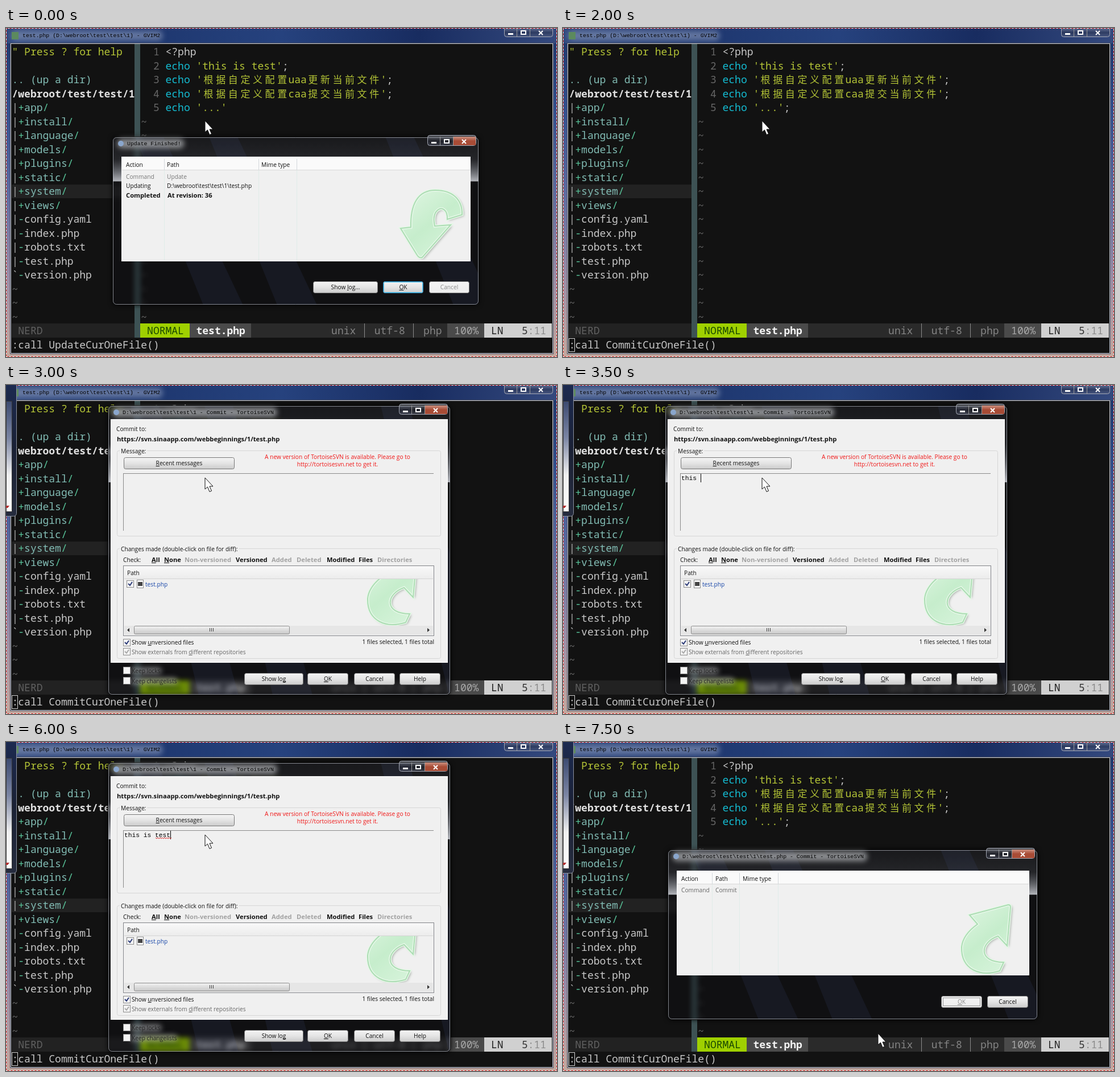
An HTML page with a canvas for the animation above (8000 ms loop, 969x578 px).

```html
<!DOCTYPE html>
<html lang="en">
<head>
<meta charset="utf-8">
<title>Committing a file from the editor</title>
<style>
html, body { margin: 0; width: 100%; height: 100%; overflow: hidden; background: #000; }
canvas { display: block; }
</style>
</head>
<body>
<canvas id="stage" width="969" height="578"></canvas>
<script>
const W = 969, H = 578, LOOP = 8000, STEP = 500;
const base = document.getElementById('stage').getContext('2d');
const layer = new OffscreenCanvas(W, H).getContext('2d');
let g = base;

const MONO = '"Noto Sans Mono", monospace';
const CJK = '"Noto Sans CJK SC", "Noto Sans CJK", sans-serif';
const UI = '"Open Sans", "Noto Sans", sans-serif';
const FIXED = '"Liberation Mono", monospace';
const CELL = 10.8, ROW = 24.52;
const colX = col => 10.5 + col * CELL;
const YELLOW = '#b4c436', CYAN = '#14bcd2', PALE = '#c8c8c8', DIM = '#666', TEAL = '#82bcb4', MINT = '#58c49a';

function box(x0, y0, x1, y1, fill, stroke) {
  if (fill) { g.fillStyle = fill; g.fillRect(x0, y0, x1 - x0, y1 - y0); }
  if (stroke) { g.strokeStyle = stroke; g.lineWidth = 1; g.strokeRect(x0 + .5, y0 + .5, x1 - x0 - 1, y1 - y0 - 1); }
}

function gradient(x0, y0, x1, y1, ...colors) {
  const grad = g.createLinearGradient(x0, y0, x1, y1);
  colors.forEach((c, i) => grad.addColorStop(i / (colors.length - 1), c));
  return grad;
}

function shape(path, fill, stroke, width = 1) {
  const p = new Path2D(path);
  if (fill) { g.fillStyle = fill; g.fill(p); }
  if (stroke) { g.strokeStyle = stroke; g.lineWidth = width; g.stroke(p); }
}

function rounded(x0, y0, x1, y1, r, fill, stroke) {
  g.beginPath();
  g.roundRect(x0 + .5, y0 + .5, x1 - x0 - 1, y1 - y0 - 1, r);
  if (fill) { g.fillStyle = fill; g.fill(); }
  if (stroke) { g.strokeStyle = stroke; g.lineWidth = 1; g.stroke(); }
}

// Editor text on the character grid; wide characters take two cells.
function put(row, col, ...spans) {
  g.textAlign = 'left';
  for (const [text, color, weight = 300] of spans) {
    g.fillStyle = color;
    for (const ch of text) {
      const wide = ch > '\u2fff';
      g.font = wide ? `300 17px ${CJK}` : `${weight} 18px ${MONO}`;
      g.fillText(ch, colX(col) + (wide ? 2.3 : 0), 48 + row * ROW);
      col += wide ? 2 : 1;
    }
  }
}

// Dialog text centred on y; "&" underlines the next letter.
function label(text, x, y, { color = '#111', bold = false, align = 'left' } = {}) {
  g.font = bold ? `bold 11.2px ${UI}` : `10.2px ${UI}`;
  g.textAlign = 'left';
  g.fillStyle = color;
  const mark = text.indexOf('&'), plain = text.replace('&', '');
  const width = s => g.measureText(s).width;
  x -= { left: 0, center: .5, right: 1 }[align] * width(plain);
  g.fillText(plain, x, y + 4);
  if (mark >= 0) g.fillRect(x + width(plain.slice(0, mark)), y + 5, width(plain[mark]), 1);
}

function glow(x0, y0, x1, y1, color) {
  g.save();
  g.filter = 'blur(5px)';
  rounded(x0, y0, x1, y1, 8, color);
  g.restore();
}

function titleText(text, x, y, size = 9.85) {
  g.font = `${size}px ${FIXED}`;
  g.textAlign = 'left';
  g.fillStyle = '#000';
  g.fillText(text, x, y + 3);
}

function captionButtons(right, top, closeColor) {
  const x = right - 91, cy = top + 8;
  rounded(x, top - 3, right - 5, top + 16, 4, gradient(0, top, 0, top + 16, 'rgba(170,176,190,.4)', 'rgba(40,44,60,.4)', 'rgba(110,116,140,.4)'), '#a4a8b4');
  if (closeColor) box(x + 46, top, right - 6, top + 15, gradient(0, top, 0, top + 15, '#cc9080', closeColor, closeColor));
  box(x + 22, top, x + 23, top + 15, '#999');
  box(x + 45, top, x + 46, top + 15, '#999');
  box(x + 7, cy + 1, x + 16, cy + 4, '#fff');
  g.strokeStyle = '#fff'; g.lineWidth = 2;
  g.strokeRect(x + 30, cy - 3, 8, 6);
  shape(`M${x + 61} ${cy - 3}l7 7m0-7l-7 7`, null, '#fff', 2);
}

function button(text, x0, x1, y, kind) {
  const fills = { hot: ['#e4f3fb', '#a9d6ef', '#7db9dc'], off: ['#f4f4f4', '#ececec'] }[kind] || ['#f5f5f5', '#e4e4e4', '#cacaca'];
  rounded(x0, y, x1, y + 21, 3, gradient(0, y, 0, y + 21, ...fills), kind === 'hot' || kind === 'focus' ? '#2f88b8' : '#777');
  if (kind === 'focus') rounded(x0 + 1, y + 1, x1 - 1, y + 20, 2, null, '#55c4ec');
  label(text, (x0 + x1) / 2, y + 10, { align: 'center', color: kind === 'off' ? '#8c8c8c' : '#111' });
}

function checkbox(x, y, checked, color = '#2b3a78') {
  box(x, y, x + 13, y + 13, '#f4f4f4', '#8c8c8c');
  if (checked) shape(`M${x + 3} ${y + 6}l3 3l4-6`, null, color, 2);
}

// Translucent dialog frame over the editor.
function glass(x0, y0, x1, y1, title, blur = 4) {
  const edge = y0 + (y1 - y0) * .265;
  g.save();
  g.shadowColor = '#000'; g.shadowBlur = 8;
  rounded(x0, y0, x1, y1, 7, '#111');
  g.restore();
  g.save();
  g.beginPath();
  g.roundRect(x0, y0, x1 - x0, y1 - y0, 7);
  g.clip();
  g.filter = `blur(${blur}px)`;
  g.drawImage(base.canvas, 0, 0);
  g.filter = 'none';
  box(x0, y0, x1, y1, 'rgba(14,14,18,.35)');
  box(x0, y0, x1, edge, gradient(0, y0, 0, edge, 'rgba(120,125,135,.08)', 'rgba(130,135,145,.18)', 'rgba(235,238,245,.75)'));
  for (const dx of [40, 170, 480])
    shape(`M${x0 + dx} ${y0}h50L${x0 + dx + 190} ${y1}h-70z`, 'rgba(75,85,140,.13)');
  g.restore();
  rounded(x0, y0, x1, y1, 7, null, '#0a0a0a');
  rounded(x0 + 1, y0 + 1, x1 - 1, y1 - 1, 6, null, 'rgba(205,210,220,.6)');
  const width = title.length * 5.92;
  glow(x0 + 8, y0 + 3, x0 + 32 + width, y0 + 21, 'rgba(150,152,156,.9)');
  g.beginPath();
  g.arc(x0 + 15, y0 + 12, 5, 0, 7);
  g.fillStyle = '#8aa6cc';
  g.fill();
  titleText(title, x0 + 26, y0 + 12);
  captionButtons(x1, y0, '#a84c36');
}

function arrow(path, x0, y0, x1, y1) {
  g.save();
  g.shadowColor = 'rgba(60,80,60,.45)';
  g.shadowBlur = 4; g.shadowOffsetX = 3; g.shadowOffsetY = 2;
  shape(path, gradient(x0, y0, x1, y1, '#def5e1', '#c6edcc', '#d8f4dc'));
  g.restore();
  shape(path, null, '#e6f8e8', 5);
  shape(path, null, '#acdcb3', 2);
}
const DOWN = 'M694 352L712 350C711 310 724 285 755 285C786 285 803 302 802 328L776 336C777 319 766 313 758 321C751 328 752 339 754 348L782 346L732 403Q727 405 723 399Z';
const UP = 'M715 304L783 286Q787 286 787 290L781 358L765 341C733 352 729 387 775 387L768 402C735 413 700 401 701 360C703 342 715 330 729 320Z';

function gvim(step) {
  g.clearRect(0, 0, W, H);
  box(0, 0, W, H, gradient(0, 0, 0, H, '#1d3468', '#34508e', '#5f6ba0', '#9a8ca6', '#c4a89e'));
  box(1, 1, 968, 27, gradient(0, 0, W, 0, '#30497e', '#1e376f', '#26427e', '#182c60', '#34497e'));
  glow(8, 4, 276, 23, 'rgba(120,136,174,.75)');
  box(10, 7, 22, 20, '#5c8a5e');
  titleText('test.php (D:\\webroot\\test\\test\\1) - GVIM2', 29, 13);
  const active = step > 0 && step < 4;
  captionButtons(967, 0, active && '#b04028');

  box(7, 26, 963, 573, '#08090c', '#4b5060');
  box(8, 27, 962, 572, '#121212', '#c9ccd4');
  box(0, 0, W, H, null, '#f2e6e6');
  g.setLineDash([3, 3]);
  box(0, 0, W, H, null, '#e01818');
  g.setLineDash([]);

  // File tree
  box(10, 275, 226, 299, '#222');
  put(0, 0, ['" Press ? for help', YELLOW]);
  put(2, 0, ['.. (up a dir)', TEAL]);
  put(3, 0, ['/webroot/test/test/1', '#e0e0e0', 600]);
  'app install language models plugins static system views'.split(' ').forEach((name, i) =>
    put(4 + i, 0, ['|', '#b0b0b0'], ['+', MINT], [name, TEAL], ['/', MINT]));
  'config.yaml index.php robots.txt test.php version.php'.split(' ').forEach((name, i) =>
    put(12 + i, 0, [i < 4 ? '|' : '`', '#b0b0b0'], ['-', MINT], [name, PALE]));
  for (let row = 17; row < 20; row++) put(row, 0, ['~', DIM]);

  // Code
  box(226, 28, 236, 544, '#3d5254');
  const code = ["'this is test'", "'根据自定义配置uaa更新当前文件'", "'根据自定义配置caa提交当前文件'", "'...'"];
  put(0, 23, ['1 ', DIM], ['<?php', PALE]);
  code.forEach((text, i) =>
    put(i + 1, 23, [`${i + 2} `, DIM], ['echo ', CYAN], [text, YELLOW], [i === 3 && step === 0 ? '' : ';', PALE]));
  if (active) {
    box(colX(35), 128, colX(36), 152, '#d8d8d8');
    put(4, 35, [';', '#121212']);
  }
  for (let row = 5; row < 20; row++) put(row, 21, ['~', DIM]);

  // Status line
  const top = 519, bottom = 544;
  box(10, top, 226, bottom, '#222');
  box(236, top, 323, bottom, '#9fd000');
  box(323, top, 431, bottom, '#4a4a4a');
  box(431, top, 776, bottom, '#2a2a2a');
  box(776, top, 841, bottom, '#4a4a4a');
  box(841, top, 960, bottom, '#d0d0d0');
  put(20, 1, ['NERD', '#606060']);
  put(20, 22, ['NORMAL', '#1c4a00', 500]);
  put(20, 30, ['test.php', '#f4f4f4', 600]);
  put(20, 52, ['unix', '#848484']);
  put(20, 59, ['utf-8', '#848484']);
  put(20, 67, ['php', '#848484']);
  box(630, top, 631, bottom, '#8c8c8c');
  box(716, top, 717, bottom, '#8c8c8c');
  put(20, 72, ['100%', '#a8a8a8']);
  put(20, 78, ['LN', '#222', 500], ['   ', '#222'], ['5', '#333'], [':11', '#8a8a8a']);
  put(21, 0, [`:call ${step < 4 ? 'Update' : 'Commit'}CurOneFile()`, PALE]);
  if (step === 2 || step === 3) put(21, 77, ['c', PALE]);
  if (step > 3) box(10, 545, 21, 569, null, '#d0d0d0');
}

// Edge of another window reaching in from the left.
function sideWindow() {
  rounded(-8, -8, 19, 231, 5, gradient(0, 0, 0, 231, '#1c2a50', '#1a2034', '#262c3e'), '#8c92a0');
  box(0, 28, 11, 223, gradient(0, 28, 0, 223, '#3c4a70', '#7c86a4', '#f0f0f0', '#fff'), '#333');
  shape('M0 212h6l-3 4h-3z', '#b03030');
}

function table(x0, x1, dividers, heads) {
  box(x0, 226, x1, 410, '#f0f0f0', '#fff');
  box(x0 + 1, 227, x1 - 1, 250, '#fafafa');
  box(x0 + 1, 249, x1 - 1, 250, '#d8d8d8');
  for (const x of dividers) {
    box(x, 250, x + 1, 409, '#e0ece9');
    box(x, 230, x + 1, 249, '#d4d8dc');
  }
  heads.forEach(([text, x]) => label(text, x, 240));
}

function updateDialog() {
  glass(187, 191, 832, 487, 'Update Finished!');
  table(203, 817, [278, 444, 511], [['Action', 211], ['Path', 283], ['Mime type', 449]]);
  label('Command', 211, 261, { color: '#777' });
  label('Update', 283, 261, { color: '#777' });
  label('Updating', 211, 277);
  label('D:\\webroot\\test\\test\\1\\test.php', 283, 277);
  label('Completed', 211, 294, { bold: true });
  label('At revision: 36', 284, 294, { bold: true });
  arrow(DOWN, 700, 290, 790, 400);
  button('Show &log...', 540, 654, 445);
  button('&OK', 663, 734, 445, 'focus');
  button('Cancel', 744, 815, 445, 'off');
}

function progressDialog() {
  glass(184, 189, 835, 488, 'D:\\webroot\\test\\test\\1\\test.php - Commit - TortoiseSVN');
  table(200, 820, [262, 310, 378], [['Action', 208], ['Path', 268], ['Mime type', 316]]);
  label('Command', 208, 260, { color: '#666' });
  label('Commit', 268, 260, { color: '#666' });
  arrow(UP, 700, 290, 790, 400);
  button('&OK', 665, 737, 446, 'off');
  g.setLineDash([1, 1]);
  box(668, 449, 734, 464, null, '#444');
  g.setLineDash([]);
  button('Cancel', 746, 818, 446);
}

function group(x0, y0, x1, y1, text) {
  rounded(x0, y0, x1, y1, 3, null, '#d6d6d6');
  g.font = `10.2px ${UI}`;
  box(x0 + 5, y0 - 2, x0 + 9 + g.measureText(text).width, y0 + 3, '#f0f0f0');
  label(text, x0 + 7, y0 + 1);
}

function commitDialog(step) {
  glass(179, 36, 782, 545, 'D:\\webroot\\test\\test\\1 - Commit - TortoiseSVN', step === 5 ? 0 : 4);
  box(184, 60, 777, 488, '#f0f0f0', '#fff');
  label('Commit to:', 194, 77);
  label('https://svn.sinaapp.com/webbeginnings/1/test.php', 195, 95, { bold: true });
  group(195, 115, 765, 266, 'Message:');
  button('&Recent messages', 207, 402, 127);
  const red = { color: '#f01818', align: 'center' };
  label('A new version of TortoiseSVN is available. Please go to', 583, 126, red);
  label('http://tortoisesvn.net to get it.', 583, 139, red);

  box(206, 155, 752, 156, '#8a8a8a');
  box(206, 155, 207, 256, '#8a8a8a');
  const typed = step < 7 ? 0 : step < 9 ? 5 : step < 10 ? 8 : step < 11 ? 11 : 12;
  titleText('this is test'.slice(0, typed), 208, 164, 11.25);
  if (step === 5 || (step > 6 && step < 13)) {
    const x = Math.round(208 + typed * 6.75);
    box(x, 156, x + 1, 171, '#000');
  }
  if (step > 11) shape('M263 168' + 'l2 2l2-2'.repeat(7), null, '#e03030');

  group(195, 287, 765, 481, 'Changes made (double-click on file for diff):');
  label('Check:', 206, 307);
  [['&All', 256], ['&None', 278], ['Non-versioned', 314, 1], ['Versioned', 404], ['Added', 467, 1],
   ['Deleted', 511, 1], ['Modified', 564], ['Files', 620], ['Directories', 653, 1]].forEach(([text, x, off]) =>
    label(text, x, 307, { bold: true, color: off ? '#a2a2a2' : '#111' }));

  box(206, 317, 753, 441, '#f0f0f0', '#85878c');
  box(208, 319, 751, 340, gradient(0, 319, 0, 340, '#f8f8f8', '#ececec'));
  box(208, 340, 751, 341, '#d4d4d4');
  label('Path', 213, 330);
  g.save();
  g.beginPath();
  g.rect(207, 341, 545, 82);
  g.clip();
  g.translate(-65, 15);
  arrow(UP, 700, 290, 790, 400);
  g.restore();
  checkbox(212, 343, true);
  box(230, 342, 242, 357, '#fff', '#888');
  box(232, 346, 240, 353, '#444');
  label('test.php', 245, 350, { color: '#1846a8' });
  box(208, 423, 751, 439, '#e6e6e6');
  rounded(225, 423, 499, 438, 2, gradient(0, 423, 0, 438, '#f4f4f4', '#dcdcdc', '#c6c6c6'), '#8c8c8c');
  for (const x of [358, 361, 364]) box(x, 427, x + 1, 433, '#444');
  shape('M217 427l-4 3.500l4 3.500zM741 427l4 3.500l-4 3.500z', '#333');

  checkbox(206, 446, true);
  label('Show &unversioned files', 221, 452);
  checkbox(206, 462, true, '#aaa');
  label('Show externals from &different repositories', 221, 469, { color: '#666' });
  label('1 files selected, 1 files total', 753, 451, { align: 'right' });
  [['Keep locks', 502, 274], ['Keep changelists', 520, 302]].forEach(([text, y, end]) => {
    glow(218, y - 6, end, y + 6, 'rgba(190,192,194,.6)');
    label(text, 221, y, { color: '#222' });
    checkbox(206, y - 7, false);
  });
  button('Show lo&g', 419, 523, 506);
  button('&OK', 530, 602, 506, step === 14 && 'hot');
  button('Cancel', 612, 684, 506);
  button('Help', 692, 764, 506);
}

function pointer(x, y) {
  g.save();
  g.translate(x, y);
  shape('M0 0V20L4.500 16L8 24.500L11.500 23L8 15H14Z', '#fff', '#111');
  g.restore();
}

function draw(step) {
  g = base;
  gvim(step);
  g = layer;
  g.clearRect(0, 0, W, H);
  if (step === 0) updateDialog();
  else if (step === 15) progressDialog();
  else if (step > 4) commitDialog(step);

  g = base;
  g.save();
  if (step === 5) {
    // Opening: slightly smaller and see-through.
    g.globalAlpha = .81;
    g.translate(430, 195);
    g.scale(.975, .975);
    g.translate(-430, -195);
  }
  g.drawImage(layer.canvas, 0, 0);
  g.restore();
  if (step > 4) sideWindow();
  pointer(...(step < 13 ? [350, 163] : step < 14 ? [524, 486] : step < 15 ? [546, 515] : [554, 512]));
}

let shown = -1;
function tick(now) {
  const step = Math.floor(now % LOOP / STEP);
  if (step !== shown) draw(shown = step);
  requestAnimationFrame(tick);
}
requestAnimationFrame(tick);
</script>
</body>
</html>
```
